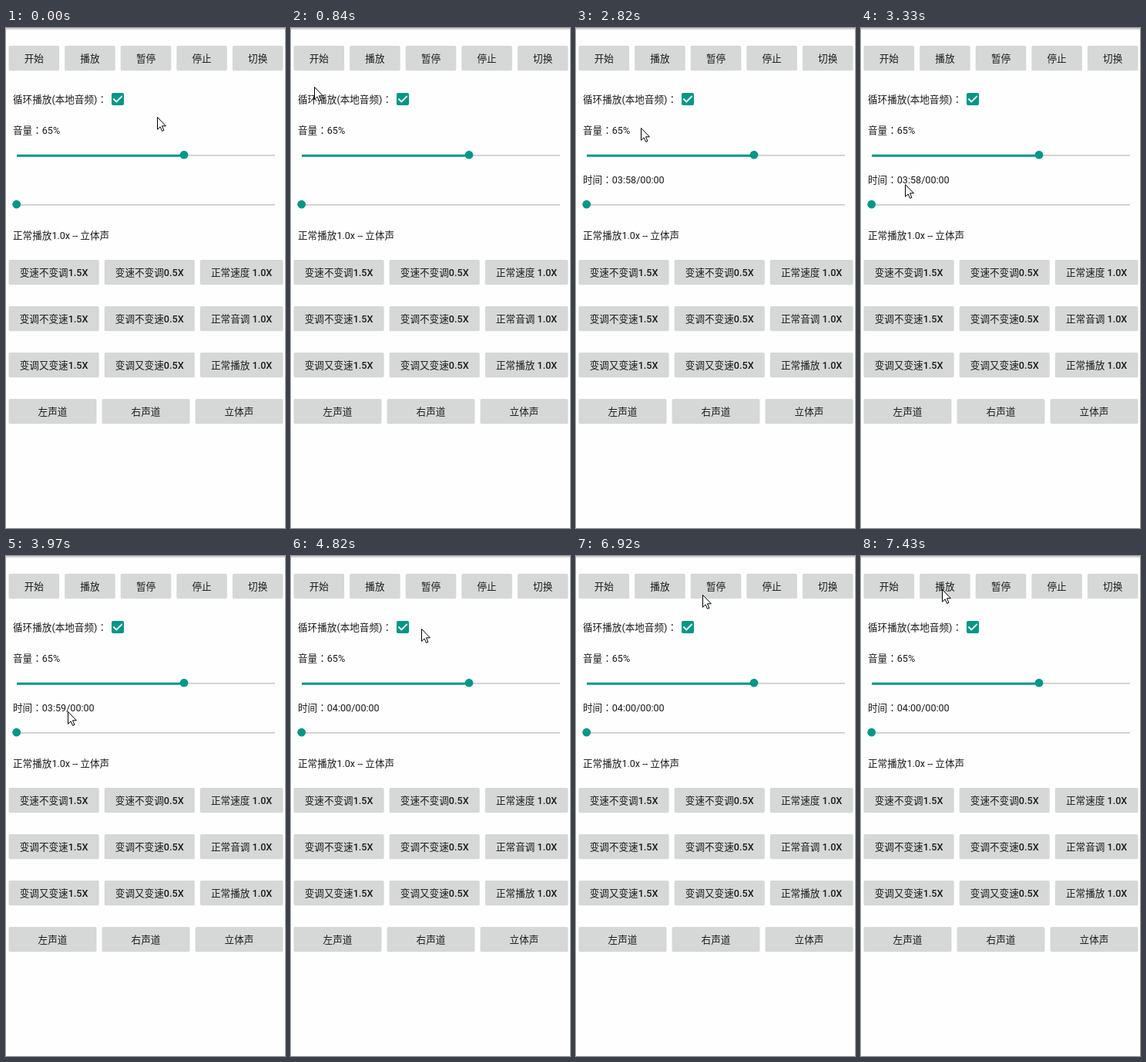
Animation of 362 by 647 pixels, one loop 8 s. Source, as an HTML page with a canvas:

```html
<!DOCTYPE html>
<html lang="zh-CN">
<head>
<meta charset="utf-8">
<style>
  html, body { margin: 0; width: 100%; height: 100%; overflow: hidden; background: #fefefe; }
  canvas { display: block; }
</style>
</head>
<body>
<canvas id="stage" width="362" height="647"></canvas>
<script>
const ctx = document.getElementById('stage').getContext('2d');
const LOOP = 8000, FRAME = 130;
const TEAL = '#009688', GREY = '#d6d7d7', PRESSED = '#bcbdbd', INK = '#1a1a1a';
const FONT = '12.6px Roboto, "Noto Sans CJK SC", "Noto Sans CJK", sans-serif';
const COLON_FONT = '12.6px "Noto Sans CJK TC", "Noto Sans CJK", sans-serif';

const controls = ['开始', '播放', '暂停', '停止', '切换'];
const effects = [
  ['变速不变调1.5X', '变速不变调0.5X', '正常速度 1.0X'],
  ['变调不变速1.5X', '变调不变速0.5X', '正常音调 1.0X'],
  ['变调又变速1.5X', '变调又变速0.5X', '正常播放 1.0X'],
  ['左声道', '右声道', '立体声']
];

// Pointer moves: begin ms, end ms, destination, easing power (above 1 starts slowly)
const moves = [
  { begin: 0, end: 570, x: 95, y: 129, power: 4 },
  { begin: 570, end: 840, x: 30, y: 76 },
  { begin: 840, end: 1320, x: 32, y: 43 },
  { begin: 2690, end: 2940, x: 136, y: 215 },
  { begin: 2940, end: 3330, x: 57, y: 202, power: 0.5 },
  { begin: 3470, end: 3970, x: 80, y: 201 },
  { begin: 4400, end: 4550, x: 126, y: 192 },
  { begin: 4550, end: 4820, x: 169, y: 94 },
  { begin: 4820, end: 5100, x: 186, y: 41 },
  { begin: 6790, end: 7040, x: 142, y: 59 },
  { begin: 7040, end: 7430, x: 105, y: 43, power: 0.5 }
];
const presses = { '开始': 1590, '暂停': 5240 };
const READY = 2390, TICK = 1155;

function pointerAt(t) {
  let x = 196, y = 115;
  for (const { begin, end, x: toX, y: toY, power = 1 } of moves) {
    if (t < begin) break;
    // The recording shows each move in a few whole steps
    const steps = Math.round((end - begin) / FRAME);
    const progress = Math.min(1, Math.floor((t - begin) / (end - begin) * steps) / steps) ** power;
    x += (toX - x) * progress;
    y += (toY - y) * progress;
  }
  return [Math.round(x), Math.round(y)];
}

function clockAt(t) {
  const playing = Math.min(t, presses['暂停']) - READY;
  const seconds = 238 + Math.floor(playing / TICK);
  const pad = n => String(n).padStart(2, '0');
  return pad(Math.floor(seconds / 60)) + ':' + pad(seconds % 60);
}

function box(x, y, w, h, color) {
  ctx.fillStyle = color;
  ctx.beginPath();
  ctx.roundRect(x, y, w, h, 2);
  ctx.fill();
}

function text(str, x, baseline, font = FONT) {
  ctx.font = font;
  ctx.fillStyle = INK;
  ctx.fillText(str, x, baseline);
  return x + ctx.measureText(str).width;
}

// Label with a centred full-width colon, followed by its value
function field(label, value, baseline) {
  const colonX = text(label, 9, baseline);
  text(value, text('：', colonX, baseline, COLON_FONT), baseline);
}

// Buttons share the spare width of the row equally
function buttonRow(labels, top, t) {
  const gap = 7, left = 3.5, total = 356;
  ctx.font = '500 ' + FONT;
  const widths = labels.map(label => ctx.measureText(label).width);
  const spare = total - gap * (labels.length - 1) - widths.reduce((a, b) => a + b);
  const padding = spare / labels.length;
  let x = left;
  labels.forEach((label, i) => {
    const held = t - presses[label];
    box(x, top, widths[i] + padding, 32.3, held >= 0 && held < FRAME - 10 ? PRESSED : GREY);
    text(label, x + padding / 2, top + 21, '500 ' + FONT);
    x += widths[i] + padding + gap;
  });
}

function slider(x, y) {
  ctx.fillStyle = '#bdbdbd';
  ctx.fillRect(14, y + 0.2, 335, 1.3);
  ctx.fillStyle = TEAL;
  ctx.fillRect(14, y - 0.3, x - 14, 3);
  ctx.beginPath();
  ctx.arc(x, y + 0.2, 5.4, 0, 2 * Math.PI);
  ctx.fill();
}

function checkbox() {
  box(137, 84, 16, 16, TEAL);
  ctx.strokeStyle = '#fff';
  ctx.lineWidth = 1.8;
  ctx.stroke(new Path2D('M139.4 91.5l3.9 3.9 7.4-7.4'));
}

const arrow = new Path2D('M.5 .5V16.3L4.1 12.9 6.6 18.4 8.9 17.4 6.5 11.8H11.4Z');

function drawPointer(x, y) {
  ctx.save();
  ctx.translate(x, y);
  ctx.fillStyle = '#fff';
  ctx.fill(arrow);
  ctx.strokeStyle = '#000';
  ctx.lineWidth = 1;
  ctx.lineJoin = 'round';
  ctx.stroke(arrow);
  ctx.restore();
}

function draw(t) {
  ctx.fillStyle = '#fefefe';
  ctx.fillRect(0, 0, 362, 647);
  ['#c9c9c9', '#dedede', '#f4f4f4'].forEach((shade, y) => {
    ctx.fillStyle = shade;
    ctx.fillRect(0, y, 362, 1);
  });

  buttonRow(controls, 23, t);
  effects.forEach((labels, i) => buttonRow(labels, 300 + 60 * i, t));

  field('循环播放(本地音频)', '', 97);
  checkbox();
  field('音量', '65%', 137);
  slider(231, 164);
  if (t >= READY) field('时间', clockAt(t) + '/00:00', 201);
  slider(13.7, 228);
  text('正常播放1.0x -- 立体声', 9, 273);

  drawPointer(...pointerAt(t));
}

function frame() {
  draw(performance.now() % LOOP);
  requestAnimationFrame(frame);
}
frame();
</script>
</body>
</html>
```
